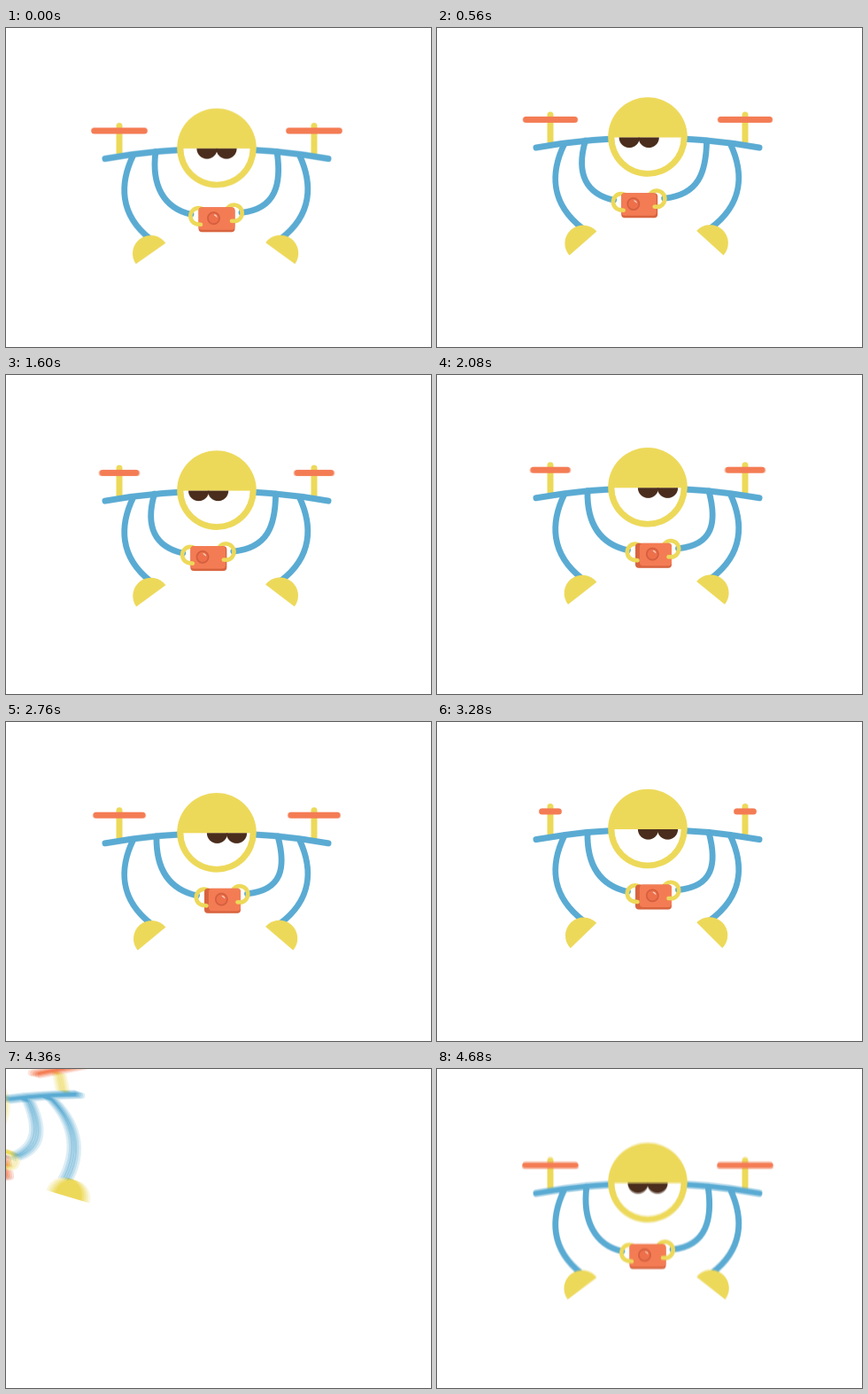
These frames come from a looping animation (480 px wide and 360 px high, 4.72 s). An HTML page with a canvas:

```html
<!DOCTYPE html>
<html lang="en">
<head>
<meta charset="utf-8">
<title>Camera drone</title>
<style>
html, body { margin: 0; width: 100%; height: 100%; overflow: hidden; background: #fff; }
canvas { display: block; width: 480px; height: 360px; }
</style>
</head>
<body>
<canvas id="stage" width="480" height="360"></canvas>
<script>
const LOOP = 4720, STEP = 40, ENTRY = 4480, W = 480, H = 360, TAU = Math.PI * 2;
const BLUE = '#5aabd3', YELLOW = '#edd959', ORANGE = '#f47c54',
      DARK = '#d8643f', BROWN = '#4a2d1c';

const stage = document.getElementById('stage').getContext('2d');
const layer = document.createElement('canvas');
layer.width = W;
layer.height = H;
const c = layer.getContext('2d');

// Eased value between [time, value] keys
function track(t, keys) {
  if (t <= keys[0][0]) return keys[0][1];
  for (let i = 1; i < keys.length; i++) {
    const [t0, a] = keys[i - 1], [t1, b] = keys[i];
    if (t < t1) return a + (b - a) * (1 - Math.cos(Math.PI * (t - t0) / (t1 - t0))) / 2;
  }
  return keys[keys.length - 1][1];
}

function bob(t) {
  if (t < 80) t += LOOP;
  if (t >= ENTRY) return 2.5 - 272 * Math.pow(Math.max(0, 4800 - t) / 320, 3.4);
  if (t < 440) return track(t, [[80, 2.5], [440, -15.3]]);
  return -9.7 - 5.6 * Math.cos(TAU * (Math.min(t, 3680) - 440) / 720);
}

function bladeWidth(t) {
  if (t >= ENTRY) t -= LOOP;
  const turns = t < 1200 ? (t + 20) / 304 : (t - 1200) / 320;
  return 45.5 + 19.8 * Math.cos(TAU * turns);
}

function pose(t) {
  const away = t >= ENTRY;
  const fly = away ? 0 : 0.0073 * Math.pow(Math.max(0, t - 3860), 1.7);
  const off = bob(t);
  return {
    x: 238 - fly,
    y: 135.5 + off - 0.32 * fly,
    tilt: away ? 0 : track(t, [[3660, 0], [3900, -11]]),
    swing: away ? 0 : track(t, [[3720, 0], [4000, 1]]),
    look: away ? 0 : track(t, [[360, 0], [600, -10.5], [1560, -10.5], [1840, 11.5], [3440, 11.5], [3680, -11]]),
    cam: away ? 0 : track(t, [[360, 0], [600, -10], [1560, -10], [1840, 6.5], [3720, 6.5], [4000, 12.8]]),
    camY: track(t, away ? [[4560, 90], [4750, 80.5]] : [[360, 80.5], [600, 77], [3720, 77], [4000, 76]]),
    lift: Math.min(1, (off / 15) ** 2),
    blade: bladeWidth(t)
  };
}

function stroke(color, width, path) {
  c.strokeStyle = color;
  c.lineWidth = width;
  c.beginPath();
  path();
  c.stroke();
}

function line(color, width, x0, y0, x1, y1) {
  stroke(color, width, () => { c.moveTo(x0, y0); c.lineTo(x1, y1); });
}

function curve(x0, y0, x1, y1, x2, y2, x3, y3) {
  stroke(BLUE, 6.8, () => { c.moveTo(x0, y0); c.bezierCurveTo(x1, y1, x2, y2, x3, y3); });
}

function disc(color, x, y, r, from = 0, to = TAU) {
  c.fillStyle = color;
  c.beginPath();
  c.arc(x, y, r, from, to);
  c.fill();
}

function box(color, x, y, w, h, r) {
  c.fillStyle = color;
  c.beginPath();
  c.roundRect(x, y, w, h, r);
  c.fill();
}

const rad = deg => deg * Math.PI / 180;

// Legs trail and stretch a little in flight; the foot turns at the ankle
function leg(side, p) {
  const isLeft = side < 0, k = p.lift;
  const stretch = 1 + 0.025 * p.swing;
  const ankleX = -19 - 2 * k, ankleY = (95 + k) * stretch;
  c.save();
  c.translate(isLeft ? -94 : 93.2, 7.5);
  c.rotate(rad(isLeft ? -2.5 * p.swing : 1 - 11 * p.swing));
  c.scale(side, 1);
  curve(0, 0, 16, 32.5 * stretch, 16, 67.5 * stretch, ankleX, ankleY);
  c.translate(ankleX, ankleY);
  c.rotate(rad((isLeft ? 22 : 2) * p.swing));
  c.translate(-0.5, 16.5 + 0.5 * k);
  c.rotate(rad(35 + 9 * k));
  disc(YELLOW, 0, 0, 20.5, Math.PI, TAU);
  c.restore();
}

const turnOf = p => Math.min(6.5, p.cam);

function arms(p) {
  const x = p.cam, y = p.camY, turn = turnOf(p);
  curve(-69 + 0.15 * turn, 4, -74 + 0.8 * turn, 42, x - 60, y - 13, x - 29, y - 6);
  curve(68 + 0.15 * turn, 4, 73.5 + 0.8 * turn, 40, turn + 67, y - 12, x + 28, y - 8);
}

function camera(p) {
  const turn = turnOf(p);
  c.save();
  c.translate(p.cam, p.camY);
  stroke(YELLOW, 4.6, () => c.arc(-20.5, -4, 9.2, rad(80), rad(300)));
  stroke(YELLOW, 4.6, () => c.arc(19.5, -7.5, 9.2, rad(-150), rad(100)));

  const left = Math.max(0, turn * 0.75), right = Math.max(0, -turn * 0.15);
  box(DARK, -20.5, -14, 41, 28, 4);
  box(ORANGE, -20.5 + left, -14, 41 - left - right, 25.5, 4);
  const lens = -3.5 + 0.36 * turn;
  disc('#ee704b', lens, -1.7, 7);
  stroke('#d35f40', 1.6, () => c.arc(lens, -1.7, 6.6, 0, TAU));
  stroke('#fbd5c5', 1.2, () => c.arc(lens, -1.7, 3.8, rad(-75), rad(-25)));

  line(YELLOW, 4.6, -22, 5, -18, 5.5);
  line(YELLOW, 4.6, 21, 1.5, 17, 1.5);
  c.restore();
}

function head(p) {
  disc(YELLOW, 0, 0, 44.8);
  disc('#fff', 0, 0.5, 37.6, 0, Math.PI);
  disc(BROWN, p.look - 11, 0.5, 11.6, 0, Math.PI);
  disc(BROWN, p.look + 11, 0.5, 11.6, 0, Math.PI);
}

function drone(p) {
  c.fillStyle = '#fff';
  c.fillRect(0, 0, W, H);
  c.save();
  c.lineCap = 'round';
  c.translate(p.x, p.y);
  c.rotate(rad(p.tilt));
  const half = p.blade / 2 - 3.5;
  for (const side of [-1, 1]) {
    const x = 110 * side;
    line(YELLOW, 7, x, -25, x, 5);
    line(ORANGE, 7, x - half, -19.6, x + half, -19.6);
    leg(side, p);
  }
  arms(p);
  stroke(BLUE, 7, () => { c.moveTo(-126, 12); c.quadraticCurveTo(0, -10.5, 126, 12); });
  camera(p);
  head(p);
  c.restore();
}

function flash(t) {
  return Math.max(0, ...[1040, 2480].map(s => t < s ? 0 : 0.6 * (1 - (t - s) / 120)));
}

// Averages a few moments around t for motion blur
function render(t) {
  const shutter = 10, n = 5;
  for (let i = 0; i < n; i++) {
    const shift = shutter * (i / (n - 1) - 0.5);
    drone(pose((t + shift + LOOP) % LOOP));
    stage.globalAlpha = 1 / (i + 1);
    stage.drawImage(layer, 0, 0);
  }
  stage.globalAlpha = flash(t);
  stage.fillStyle = '#fff';
  stage.fillRect(0, 0, W, H);
  stage.globalAlpha = 1;
}

function tick() {
  render(Math.floor(performance.now() % LOOP / STEP) * STEP);
  requestAnimationFrame(tick);
}
tick();
</script>
</body>
</html>
```
